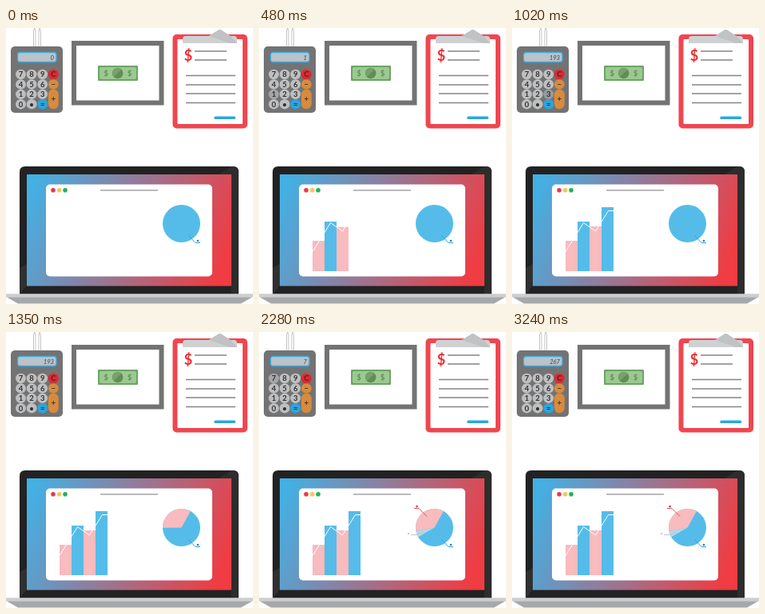
Animation, 309 px wide and 345 px high, one loop 4500 ms. Source, as an HTML page:

```html
<!DOCTYPE html>
<html lang="en">
<head>
<meta charset="utf-8">
<title>Budget dashboard</title>
<style>
  html, body { margin: 0; width: 100%; height: 100%; overflow: hidden; background: #fff; }
  svg { display: block; width: 309px; height: 345px; }
  text { font-family: Lato, "Open Sans", sans-serif; text-anchor: middle; }
  .key text { font-size: 9.5px; font-weight: 700; fill: #333; }
  #display { font-size: 7.6px; font-style: italic; text-anchor: end; fill: #444; }
  .thin { fill: none; stroke-width: 1; }
</style>
</head>
<body>
<svg viewBox="0 0 309 345">
  <defs>
    <linearGradient id="glow" gradientUnits="userSpaceOnUse" x1="30" y1="205" x2="270" y2="300">
      <stop offset="0" stop-color="#43b0e4"/>
      <stop offset="1" stop-color="#f03c42"/>
    </linearGradient>
    <linearGradient id="metal" x2="0" y2="1">
      <stop offset="0" stop-color="#d2d3d4"/>
      <stop offset="1" stop-color="#b4b5b7"/>
    </linearGradient>
  </defs>

  <!-- calculator -->
  <path d="M34.500 24V4l1-4M37 24V4l-1-4M41 24V5l1-5M43.500 24V5l-1-5" class="thin" stroke="#c4c4c4"/>
  <rect x="6" y="23" width="65" height="83" rx="5" fill="#737373"/>
  <rect x="14.500" y="30.500" width="48.500" height="12" rx="3" fill="#bac3ca" stroke="#35aee5" stroke-width="1.300"/>
  <text id="display" x="60" y="39.500">0</text>
  <g id="keys"></g>

  <!-- framed banknote -->
  <rect x="85" y="19" width="109.500" height="74.500" fill="#fff" stroke="#737373" stroke-width="6"/>
  <rect x="115" y="47" width="50" height="19" rx="1" fill="#6ea467"/>
  <rect x="117" y="49" width="46" height="15" rx="2" fill="#9bc990"/>
  <circle cx="139.700" cy="56.500" r="6.800" fill="#608e58"/>
  <path d="M134.900 61.300A6.800 6.800 0 0 1 144.500 51.700Z" fill="#76a36c"/>
  <g font-size="9" font-weight="700" fill="#5b8f55">
    <text x="125" y="59.700">$</text><text x="154.500" y="59.700">$</text>
  </g>

  <!-- clipboard -->
  <rect x="208.500" y="8" width="93.500" height="117.500" rx="5" fill="#ef4650"/>
  <rect x="214.500" y="14" width="81.500" height="106" rx="1" fill="#fff"/>
  <path d="M221 19v-5q0-4 4-4h28q2 0 4-2l8-5q3-2 5 0l8 6q2 1 4 1h3q4 0 4 4v5z" fill="#cfd0d1"/>
  <path d="M254 10l11-7q3-2 5 0l11 7 8 9h-9z" fill="#c1c2c4"/>
  <text x="228" y="41" font-size="18" font-weight="700" fill="#ee2c32">$</text>
  <path d="M236 29h40M236 40h40M225 59.500h62M225 71h62M225 82h62M225 93.500h62" stroke="#858585" stroke-width="1.400"/>
  <path d="M262 112.300h23.500" stroke="#27a8df" stroke-width="3.400" stroke-linecap="round"/>

  <!-- laptop -->
  <path d="M17 333V180q0-7 7-7h260q7 0 7 7v153z" fill="#222"/>
  <path d="M266 183l16-10h2q7 0 7 7v153h-9V183z" fill="#2d2d2d"/>
  <path d="M17 300l9-5v27l-9 11z" fill="#303030"/>
  <rect x="26" y="183" width="256" height="139.500" fill="url(#glow)"/>
  <rect x="50" y="195.500" width="208" height="115" rx="5" fill="#fff"/>
  <circle cx="59" cy="202.800" r="2.800" fill="#ea3a4a"/>
  <circle cx="66.700" cy="202.800" r="2.800" fill="#efcb58"/>
  <circle cx="74" cy="202.800" r="2.800" fill="#23b25a"/>
  <path d="M118 202.800h72" stroke="#929292" stroke-width="1.300"/>
  <path d="M0 332.500h309v3l-10 5H10L0 335.500z" fill="url(#metal)"/>
  <path d="M1 336.500h307l-14 8H15z" fill="#a7a8aa"/>
  <path d="M0 332.500h309v4H0z" fill="#cdced0"/>

  <!-- charts -->
  <g id="bars"></g>
  <path d="M67 279.500L89.500 243.500 104.500 254 120.500 228.500H127" class="thin" stroke="#fff"/>
  <circle cx="219.500" cy="244.500" r="23.500" fill="#55bce9"/>
  <path id="pale" fill="#b3d8ea"/>
  <path id="pink" fill="#f8bbbe"/>
  <path d="M228.500 259.500l8.500 9h6" class="thin" stroke="#2aa2da"/>
  <circle cx="240" cy="266" r="1.300" fill="#1c83b8"/>
  <g id="pinkNote">
    <path d="M210 230.500l-10-10h-6" class="thin" stroke="#e4525b" pathLength="1" stroke-dasharray="1"/>
    <circle cx="197.500" cy="218" r="1.300" fill="#de2f3b"/>
  </g>
  <g id="paleNote">
    <path d="M206 249.500l-8 4h-8" class="thin" stroke="#b9c9d2" pathLength="1" stroke-dasharray="1"/>
    <circle cx="187" cy="252" r="1" fill="#b3b9bd"/>
  </g>
</svg>

<script>
const LOOP = 4500, FADE = 270;
const $ = id => document.getElementById(id);
const span = (t, from, to) => Math.min(1, Math.max(0, (t - from) / (to - from)));

function add(parent, tag, attrs, text = '') {
  const el = document.createElementNS('http://www.w3.org/2000/svg', tag);
  for (const name in attrs) el.setAttribute(name, attrs[name]);
  el.textContent = text;
  parent.append(el);
  return el;
}

// Each press: time, key, resulting display
const presses = [
  [270, '1', '1'], [540, '9', '19'], [840, '3', '193'], [1530, '+', '+'],
  [2070, '7', '7'], [2340, '4', '74'], [2970, '=', '267']
];
const shades = {};
const keyColors = { C: '#e8242c', '−': '#d88b3d', '+': '#d88b3d', '=': '#29a6df' };

[...'789C456−123+0•='].forEach((label, i) => {
  const x = 18.5 + i % 4 * 13.6, y = 58 + Math.floor(i / 4) * 12.4;
  const tall = label === '+';
  const shape = { x: x - 6.4, y: y - 6.2, width: 12.8, height: tall ? 24.6 : 12.4, rx: 6.3 };
  const key = add($('keys'), 'g', { class: 'key' });
  add(key, 'rect', { ...shape, fill: keyColors[label] || '#bebfc0' });
  add(key, 'text', { x, y: y + (tall ? 9.4 : 3.3) }, label);
  shades[label] = add(key, 'rect', { ...shape, fill: '#333', opacity: 0 });
});

const BASE = 304;
const bars = [38, 62, 56, 80].map((height, i) => ({
  height,
  el: add($('bars'), 'rect', { x: 67 + 15 * i, width: 15, fill: i % 2 ? '#55bce9' : '#f8bbbe' })
}));

// Wedge running counterclockwise; angles are clockwise from the top
function wedge(from, to) {
  const point = deg => {
    const a = deg * Math.PI / 180;
    return `${219.5 + 23.5 * Math.sin(a)} ${244.5 - 23.5 * Math.cos(a)}`;
  };
  return `M219.5 244.5L${point(from)}A23.5 23.5 0 0 0 ${point(to)}Z`;
}

function drawNote(id, amount) {
  const [line, dot] = $(id).children;
  $(id).style.display = amount ? '' : 'none';
  line.setAttribute('stroke-dashoffset', 1 - amount);
  dot.setAttribute('opacity', span(amount, 0.6, 1));
}

function draw(t) {
  let shown = '0';
  for (const [start, label, result] of presses) {
    if (t >= start) shown = result;
    shades[label].setAttribute('opacity', t < start ? 0 : 0.8 * (1 - span(t, start, start + FADE)));
  }
  $('display').textContent = shown;

  bars.forEach(({ height, el }, i) => {
    const start = 24 + 153 * i, h = height * span(t, start, start + 153);
    el.setAttribute('y', BASE - h);
    el.setAttribute('height', h);
  });

  const sweep = 149 * span(t, 1080, 1418);
  $('pink').setAttribute('d', wedge(29, 29 - Math.min(sweep, 130)));
  $('pale').setAttribute('d', sweep > 130 ? wedge(-101, 29 - sweep) : '');
  drawNote('pinkNote', span(t, 1470, 1620));
  drawNote('paleNote', span(t, 1680, 1800));
}

const began = performance.now();
function tick() {
  draw((performance.now() - began) % LOOP);
  requestAnimationFrame(tick);
}
tick();
</script>
</body>
</html>
```
